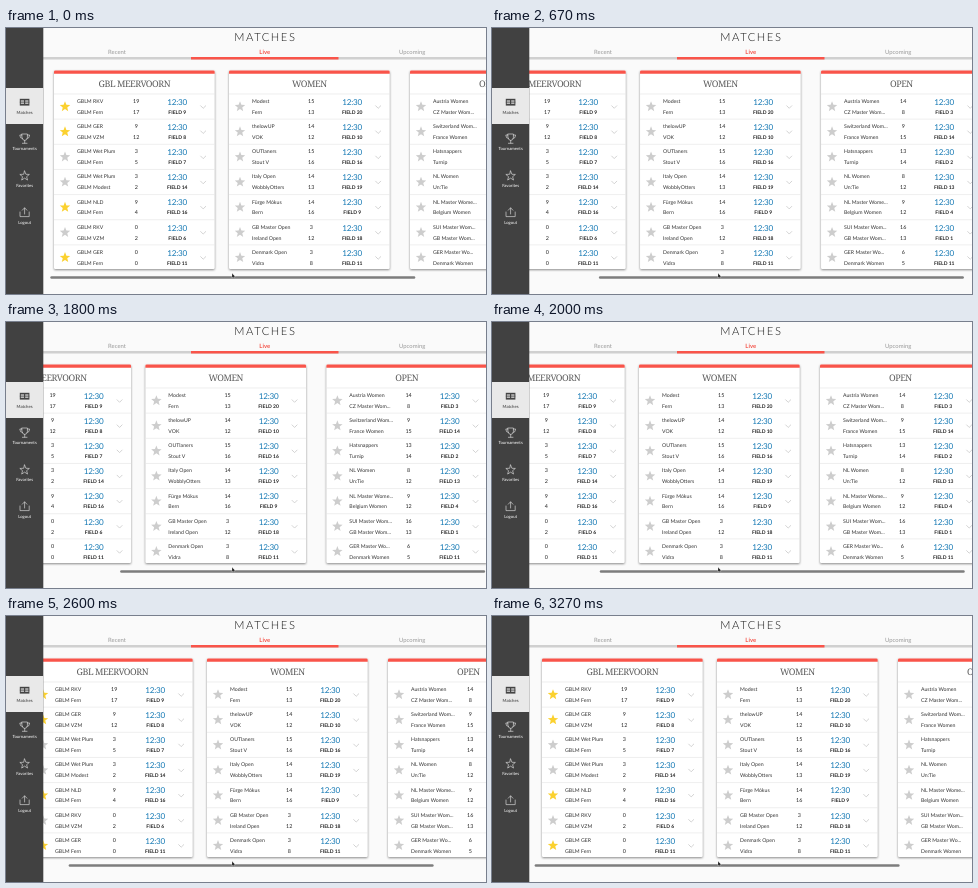
These frames come from a looping animation (480x266 px, 3340 ms). An HTML page:

```html
<!DOCTYPE html>
<html lang="en">
<head>
<meta charset="utf-8">
<title>Matches</title>
<style>
  html, body { margin: 0; width: 100%; height: 100%; overflow: hidden; background: #fafafa; }
  svg { display: block; width: 100%; height: 100%; }
  text { font-family: Lato, sans-serif; fill: #333; text-rendering: geometricPrecision; }
  .mid { text-anchor: middle; }
  .heading { font-size: 11.2px; font-weight: 300; letter-spacing: 1.55px; fill: #111; }
  .tab { font-size: 5.9px; fill: #999; }
  .active { font-weight: 700; fill: #f4554b; }
  .menu { font-size: 4.25px; fill: #fff; }
  .selected { fill: #333; }
  .icon { fill: none; stroke: #ddd; stroke-width: .65; stroke-linejoin: round; stroke-linecap: round; }
  .title { font: 300 9px "Noto Serif", serif; letter-spacing: -.45px; fill: #5c5c5c; }
  .team { font-size: 5.2px; }
  .score { font-size: 5.4px; fill: #222; }
  .time { font-size: 8.1px; letter-spacing: -.2px; fill: #1579b4; }
  .field { font-size: 5px; font-weight: 700; fill: #222; }
  .card { filter: drop-shadow(0 1px .8px rgba(0, 0, 0, .45)); }
  .rule { stroke: #e2e2e2; stroke-width: .6; }
  .chevron { fill: none; stroke: #c8c8c8; stroke-width: .8; }
</style>
</head>
<body>
<svg viewBox="0 0 480 266" preserveAspectRatio="none">
  <defs><clipPath id="content"><rect x="37" y="32" width="443" height="234"/></clipPath></defs>
  <rect width="480" height="266" fill="#fafafa"/>

  <text class="mid heading" x="259.4" y="13.2">MATCHES</text>
  <text class="mid tab" x="111" y="25.7">Recent</text>
  <text class="mid tab active" x="258.7" y="25.7">Live</text>
  <text class="mid tab" x="406.2" y="25.7">Upcoming</text>
  <rect x="37" y="29" width="443" height="2.5" fill="#d0d0d0"/>
  <rect x="185" y="29" width="147.5" height="2.5" fill="#f9544a"/>

  <g clip-path="url(#content)"><g id="cards"></g></g>
  <rect id="bar" y="248.2" width="365" height="2.6" rx="1.3" fill="#7d7d7d"/>

  <rect width="37.3" height="266" fill="#414141"/>
  <rect y="60" width="37.3" height="36" fill="#e9e9e9"/>
  <g id="menu"></g>
  <rect x="13.8" y="70.8" width="9.6" height="6.8" fill="#444"/>
  <path d="M14.8 72.3h3.2v3.6h-3.2zM19.2 72.3h3.2v3.6h-3.2z" fill="#bbb"/>
  <path d="M13.8 74.2h9.6" stroke="#444" stroke-width=".6"/>
  <g class="icon">
    <path d="M16 106h5.4v3.6q-.4 2.8-2.7 2.8t-2.7-2.8zM16 107h-2.2q0 3.4 2.5 3.6M21.4 107h2.2q0 3.4-2.5 3.6M18.7 112.4v2.6M16.4 115.3h4.6"/>
    <path d="M14 184v4.6h9.2v-4.6M18.6 186v-6M16.3 182.2l2.3-2.4 2.3 2.4"/>
  </g>
  <path d="M226 245.3v4.6l1.1-.9.8 1.5.7-.4-.7-1.4h1.4z" fill="#111" stroke="#fff" stroke-width=".3"/>
</svg>
<script>
const CARDS = [
  { x: 48, title: "GBL MEERVOORN", rows: [
    ["GBLM RKV", 19, "GBLM Fern", 17, 9, 1],
    ["GBLM GER", 9, "GBLM VZM", 12, 8, 1],
    ["GBLM Wet Plum", 3, "GBLM Fern", 5, 7],
    ["GBLM Wet Plum", 3, "GBLM Modest", 2, 14],
    ["GBLM NLD", 9, "GBLM Fern", 4, 16, 1],
    ["GBLM RKV", 0, "GBLM VZM", 2, 6],
    ["GBLM GER", 0, "GBLM Fern", 0, 11, 1]] },
  { x: 223, title: "WOMEN", rows: [
    ["Modest", 15, "Fern", 13, 20],
    ["thelowUP", 14, "VOK", 12, 10],
    ["OUTlaners", 15, "Stout V", 16, 16],
    ["Italy Open", 14, "WobblyOtters", 13, 19],
    ["Fürge Mókus", 14, "Bern", 16, 9],
    ["GB Master Open", 3, "Ireland Open", 12, 18],
    ["Denmark Open", 3, "Vidra", 8, 11]] },
  { x: 404, title: "OPEN", rows: [
    ["Austria Women", 14, "CZ Master Wom...", 8, 3],
    ["Switzerland Wom...", 9, "France Women", 15, 14],
    ["Hatsnappers", 13, "Turnip", 14, 2],
    ["NL Women", 8, "Un:Tie", 12, 13],
    ["NL Master Wome...", 9, "Belgium Women", 12, 4],
    ["SUI Master Wom...", 16, "GB Master Wom...", 13, 1],
    ["GER Master Wo...", 6, "Denmark Women", 5, 11]] }
];
const CARD_WIDTH = 160.7, ROW_HEIGHT = 25.15;

const text = (cls, x, y, value) => `<text class="${cls}" x="${x}" y="${y}">${value}</text>`;

function star(cx, cy, radius, attrs) {
  const points = Array.from({ length: 10 }, (_, i) => {
    const r = i % 2 ? radius * .43 : radius, a = i * Math.PI / 5;
    return `${(cx + r * Math.sin(a)).toFixed(2)},${(cy - r * Math.cos(a)).toFixed(2)}`;
  });
  return `<polygon points="${points.join(" ")}" ${attrs}/>`;
}

function row([home, homeScore, away, awayScore, field, starred], i) {
  const top = 66 + i * ROW_HEIGHT, first = top + 8.9, second = top + 19.8;
  return `<path class="rule" d="M0 ${top}h${CARD_WIDTH}"/>` +
    star(11, top + 12.7, 5.5, `fill="${starred ? "#fbd12f" : "#cdcdcd"}"`) +
    text("team", 23, first, home) + text("team", 23, second, away) +
    text("mid score", 82.2, first, homeScore) + text("mid score", 82.2, second, awayScore) +
    text("mid time", 123.2, top + 10.8, "12:30") +
    text("mid field", 123.2, second, "FIELD " + field) +
    `<path class="chevron" d="M146.4 ${top + 11.5}l2.8 2.8 2.8-2.8"/>`;
}

const card = ({ x, title, rows }) => `<g transform="translate(${x})">
  <rect class="card" y="42.5" width="${CARD_WIDTH}" height="198.5" rx="1.2" fill="#fff"/>
  <path d="M0 45.8v-2q0-1.3 1.3-1.3h${CARD_WIDTH - 2.6}q1.3 0 1.3 1.3v2z" fill="#f9544a"/>
  ${text("mid title", CARD_WIDTH / 2, 59.3, title)}${rows.map(row).join("")}</g>`;

const cards = document.getElementById("cards");
const bar = document.getElementById("bar");
cards.innerHTML = CARDS.map(card).join("");
document.getElementById("menu").innerHTML =
  ["Matches", "Tournaments", "Favorites", "Logout"]
    .map((label, i) => text(i ? "mid menu" : "mid menu selected", 18.6, 85.6 + i * 36.7, label)).join("") +
  star(18.6, 148, 5, 'class="icon"');

// Scroll path: time in ms, offset in px, velocity in px/ms.
const PATH = [
  [0, 0, .05], [400, 40, .13], [667, 75, .08], [960, 84, 0], [1735, 84, 0],
  [2000, 76, -.07], [2600, 22, -.08], [3270, -2, 0], [3340, -2, 0]
];

function scrollAt(t) {
  const i = PATH.findIndex(p => p[0] > t);
  const [t0, p0, v0] = PATH[i - 1], [t1, p1, v1] = PATH[i];
  const d = t1 - t0, s = (t - t0) / d, q = 1 - s;
  return q * q * ((1 + 2 * s) * p0 + s * d * v0) + s * s * ((3 - 2 * s) * p1 - q * d * v1);
}

function barOpacity(t) {
  if (t >= 1795) return 1;
  return Math.min(1, Math.max(.03, (1130 - t) / 200));
}

const LOOP = 3340, STEP = 1000 / 15;
const start = performance.now();

function draw() {
  const clock = (performance.now() - start) % LOOP;
  const t = Math.min(49, Math.floor((clock + 4) / STEP)) * STEP;
  const offset = scrollAt(t);
  cards.setAttribute("transform", `translate(${-offset.toFixed(2)})`);
  bar.setAttribute("x", (44.3 + offset * .835).toFixed(2));
  bar.setAttribute("opacity", barOpacity(t));
  requestAnimationFrame(draw);
}
draw();
</script>
</body>
</html>
```
